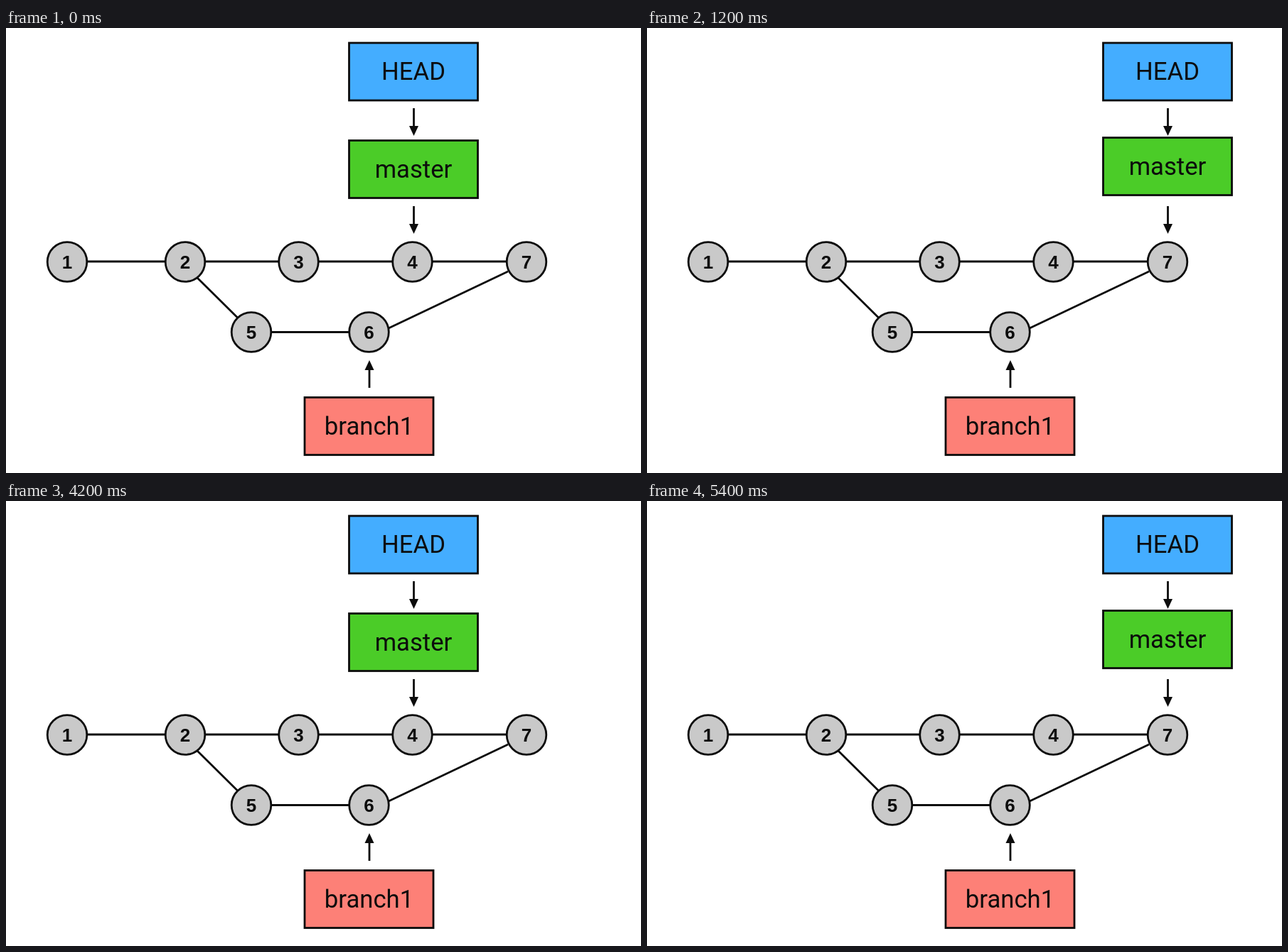
Animation, 893 px wide and 627 px high, one loop 5600 ms. Source, as an HTML page:

```html
<!DOCTYPE html>
<html lang="en">
<head>
<meta charset="utf-8">
<title>Branch merge</title>
<style>
  html, body { margin: 0; width: 100%; height: 100%; overflow: hidden; background: #fff; }
  svg { display: block; width: 100%; height: 100%; }
  rect, circle, line { stroke: #0c0c0c; stroke-width: 2.8; }
  circle { fill: #c9c9c9; }
  text { fill: #0c0c0c; text-anchor: middle; font: 34.7px Roboto, sans-serif; }
  .num { font: bold 26px "Liberation Sans", Arial, sans-serif; }
</style>
</head>
<body>
<svg id="stage" viewBox="0 0 893 627"></svg>
<script>
const LOOP = 5600, STEP = 200, TRAVEL = 159;

const line = (x1, y1, x2, y2) => `<line x1="${x1}" y1="${y1}" x2="${x2}" y2="${y2}"/>`;

const node = (n, x, y) =>
  `<circle cx="${x}" cy="${y}" r="27.8"/><text class="num" x="${x}" y="${y + 9.8}">${n}</text>`;

const label = (name, x, y, fill) =>
  `<rect x="${x - 90.5}" y="${y - 40.5}" width="181" height="81" fill="${fill}"/>` +
  `<text x="${x}" y="${y + 11.7}">${name}</text>`;

// dir: 1 points down, -1 points up
const arrow = (x, tail, tip, dir) =>
  line(x, tail, x, tip - 10 * dir) +
  `<path d="M${x} ${tip}l-6.5 ${-14 * dir}h13z" fill="#0c0c0c"/>`;

document.getElementById('stage').innerHTML =
  line(114, 329, 224, 329) + line(280, 329, 384, 329) + line(439, 329, 544, 329) +
  line(269, 352, 326, 408.5) + line(373, 428.5, 483, 428.5) +
  node(1, 86, 329.5) + node(2, 252, 329.5) + node(3, 411.5, 329.5) +
  node(4, 571.5, 329.5) + node(5, 345, 428.5) + node(6, 510.5, 428.5) +
  `<g id="merge">${line(600, 329, 704, 329)}${line(538, 423, 706, 343)}${node(7, 732, 329.5)}</g>` +
  arrow(511, 507, 468, -1) + label('branch1', 510.5, 561, '#fd8077') +
  `<g id="head">${label('HEAD', 573, 61.5, '#44adff')}` +
  arrow(573.5, 113, 152, 1) + arrow(573.5, 251, 290, 1) +
  `<g id="master">${label('master', 573, 199, '#4bcc28')}</g></g>`;

const merge = document.getElementById('merge');
const head = document.getElementById('head');
const master = document.getElementById('master');

function ease(t, start, duration) {
  const p = Math.min(1, Math.max(0, (t - start) / duration));
  return (1 - Math.cos(Math.PI * p)) / 2;
}

function draw(now) {
  const t = Math.floor(now % LOOP / STEP) * STEP;
  const moved = ease(t < 2400 ? t : t - 4200, 81, 1114);
  head.setAttribute('transform', `translate(${TRAVEL * moved} 0)`);
  master.setAttribute('transform', `translate(0 ${-4 * moved})`);
  merge.setAttribute('opacity', t < 2400 ? 1 : ease(t, 2965, 1000));
}

let begin;
function tick(now) {
  begin ??= now;
  draw(now - begin);
  requestAnimationFrame(tick);
}
draw(0);
requestAnimationFrame(tick);
</script>
</body>
</html>
```
